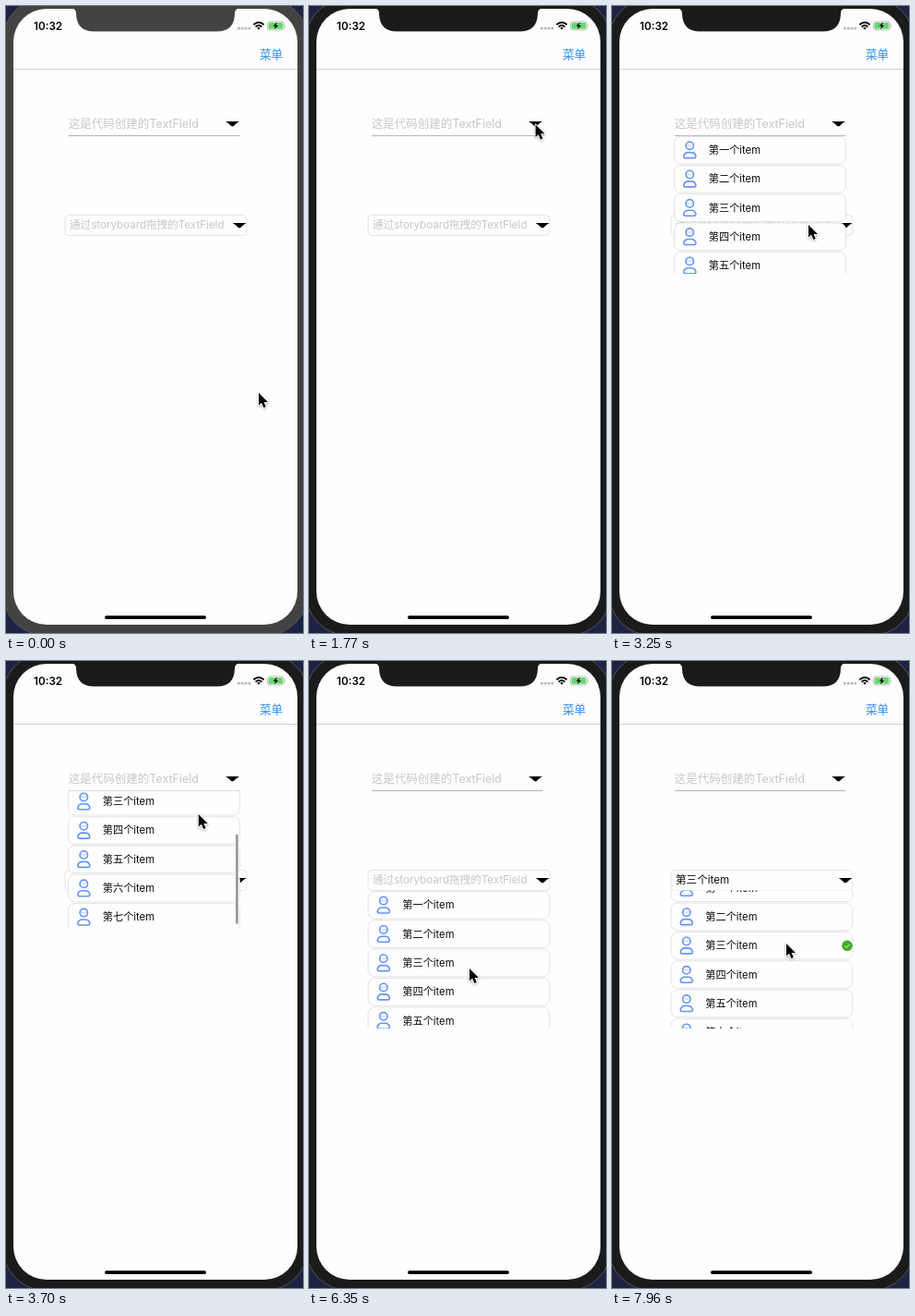
Animation, 322 px wide and 679 px high, one loop 8 s. Source, as an HTML page:

```html
<!DOCTYPE html>
<html lang="zh">
<head>
<meta charset="utf-8">
<title>Dropdown text fields</title>
<style>
  html, body { margin: 0; width: 100%; height: 100%; overflow: hidden; background: #1d2443; }
  svg { display: block; width: 322px; height: 679px; }
  text { font-family: Inter, "Noto Sans CJK SC", "Noto Sans CJK", sans-serif; white-space: pre; }
  .hint { fill: #c7c7cb; }
  .row { fill: #fefefe; stroke: #dedee0; stroke-width: .8; }
  .icon { fill: none; stroke: #6494f7; stroke-width: 1.6; stroke-linejoin: round; }
  .item { font-size: 11.2px; fill: #0a0a0a; }
</style>
</head>
<body>
<svg viewBox="0 0 322 679">
  <defs>
    <g id="person" class="icon">
      <circle cy="-4.8" r="4.2"/>
      <path d="M-3.4 -5.6Q0 -3.4 3.4 -5.6" stroke-width=".7" opacity=".6"/>
      <path d="M-4.6 8.6H4.6Q7 8.4 6.5 6.2Q5.2 2.6 1.8 2.6H-1.8Q-5.2 2.6 -6.5 6.2Q-7 8.4 -4.6 8.6Z"/>
    </g>
    <path id="arrow" d="M0 0H15Q12.5 1.2 9 4.7Q7.5 6 6 4.7Q2.5 1.2 0 0Z"/>
    <clipPath id="clip0"><rect x="60" y="140.5" width="210" height="0"/></clipPath>
    <clipPath id="clip1"><rect x="60" y="248.5" width="210" height="0"/></clipPath>
    <filter id="shadow" x="-50%" y="-50%" width="200%" height="200%">
      <feDropShadow dx="0" dy=".8" stdDeviation=".8" flood-opacity=".4"/>
    </filter>
  </defs>

  <rect width="322" height="679" fill="#1d2443"/>
  <g id="bezel">
    <rect x="-4" y="-9" width="332" height="691" rx="48" stroke="#50545e" stroke-width="1"/>
    <rect x="8" y="3" width="308" height="667" rx="36" fill="#fefefe"/>
    <path d="M71 2.5Q76 3 76 8Q76.5 27.5 95 27.5H229Q247.5 27.5 248 8Q248 3 253 2.5Z"/>
  </g>

  <text x="30" y="25.5" font-size="11.7" font-weight="600">10:32</text>
  <g fill="#b4b4b6">
    <rect x="251" y="23" width="2.8" height="2.6" rx=".8"/>
    <rect x="254.8" y="23" width="2.8" height="2.6" rx=".8"/>
    <rect x="258.6" y="23" width="2.8" height="2.6" rx=".8"/>
    <rect x="262.4" y="23" width="2.8" height="2.6" rx=".8"/>
  </g>
  <g fill="none" stroke="#000" stroke-width="1.9">
    <path d="M268.4 20.2Q274 15.2 279.6 20.2"/>
    <path d="M270.6 22.6Q274 19.6 277.4 22.6"/>
    <path d="M272.2 23.8Q274 22.4 275.8 23.8L274 25.8Z" fill="#000" stroke="none"/>
  </g>
  <rect x="283.4" y="16.9" width="18" height="9" rx="2.5" fill="none" stroke="#a9a9ab" stroke-width=".8"/>
  <rect x="284.6" y="18" width="15.6" height="6.8" rx="1.5" fill="#67d76c"/>
  <path d="M302.4 20Q304 21.4 302.4 22.8Z" fill="#a9a9ab"/>
  <path d="M293.8 17.6L289.6 21.8H292L291 25.2L295.2 20.9H292.8Z"/>

  <text x="275" y="56.6" font-size="12.6" font-weight="500" fill="#2f8ef0">菜单</text>
  <path d="M8 68.5H316" stroke="#cfcfd1"/>
  <rect x="107" y="660.2" width="110" height="3.8" rx="1.9"/>

  <text class="hint" x="67.8" y="132" font-size="12.5">这是代码创建的TextField</text>
  <path d="M68 140.5H253.5" stroke="#b2b2b4"/>
  <use href="#arrow" x="238" y="125"/>

  <rect x="64" y="226.4" width="196.8" height="22.2" rx="4" fill="#fefefe" stroke="#dfdfe1" stroke-width=".8"/>
  <text id="field" class="hint" x="69" y="241.4" font-size="11.6"></text>
  <use href="#arrow" x="245.6" y="235"/>

  <g clip-path="url(#clip0)"><g id="list0"></g><rect id="bar" x="249.2" width="2.4" height="97" rx="1.2" fill="#8e8e90"/></g>
  <g clip-path="url(#clip1)"><g id="list1"></g>
    <g id="check">
      <circle r="5.8" fill="#43ad27"/>
      <path d="M-2.8 .1L-.8 2.1L2.9 -1.8" fill="none" stroke="#d9f0d2" stroke-width="1"/>
    </g>
    <rect id="bar1" x="256.6" width="2.4" height="97" rx="1.2" fill="#8e8e90"/>
  </g>

  <path id="cursor" d="M1 1V14.6L4.1 11.8L6.4 17L8.8 16L6.6 10.9H11Z" stroke="#fff" stroke-width="1.6"
        paint-order="stroke" stroke-linejoin="round" filter="url(#shadow)"/>
</svg>

<script>
const LOOP = 8000, TICK = 147.4;
const PITCH = 31.3, HEIGHT = 149.5, OPEN_TICKS = 3.4;
const NUMERALS = [...'一二三四五六七'];
const $ = id => document.getElementById(id);

const label = i => `第${NUMERALS[i]}个item`;
const clamp = v => Math.min(1, Math.max(0, v));
const ease = v => (1 - Math.cos(Math.PI * clamp(v))) / 2;

// keys are [tick, ...values]; eased between neighbours, held outside
function track(keys, n) {
  const next = keys.findIndex(k => k[0] > n);
  if (next === 0) return keys[0].slice(1);
  if (next < 0) return keys.at(-1).slice(1);
  const [a, b] = [keys[next - 1], keys[next]];
  const p = ease((n - a[0]) / (b[0] - a[0]));
  return a.slice(1).map((v, i) => v + (b[i + 1] - v) * p);
}

const cursorKeys = [
  [5, 273, 418], [11, 244.6, 127.4], [18, 244.6, 127.4], [22, 212, 236], [25, 207.8, 165],
  [26, 207.8, 165], [29, 245, 127], [32, 245, 127], [33, 245, 151], [34, 251, 228.5], [35, 250, 236],
  [39, 250, 236], [43, 173, 332], [44, 176, 350], [47, 177, 332], [50, 177, 332], [53, 188, 305]
];
const scrollKeys = [
  [[22, 0], [25, 66.4]],
  [[44, 0], [47, 18.7]]
];

function buildList(list, x, width, top) {
  list.innerHTML = NUMERALS.map((_, i) => {
    const y = top + i * PITCH;
    return `<rect class="row" x="${x}" y="${y - 14.8}" width="${width}" height="29.6" rx="7"/>
      <use href="#person" x="${x + 16.8}" y="${y}"/>
      <text class="item" x="${x + 37.3}" y="${y + 4}">${label(i)}</text>`;
  }).join('');
}
buildList($('list0'), 67.5, 186, 156);
buildList($('list1'), 64, 196.8, 264.4);

function setList(index, open, scroll) {
  $('clip' + index).firstElementChild.setAttribute('height', HEIGHT * open);
  $('list' + index).setAttribute('transform', `translate(0 ${-scroll})`);
}

function setBar(bar, top, scroll, opacity) {
  bar.setAttribute('y', top + scroll * 0.69);
  bar.setAttribute('opacity', opacity);
}

function render(time) {
  const n = Math.floor(time / TICK + 0.07);
  const [scroll0] = track(scrollKeys[0], n);
  const [scroll1] = track(scrollKeys[1], n);
  const open0 = ease((n - 11.87) / OPEN_TICKS) - ease((n - 30.1) / OPEN_TICKS);
  const open1 = ease((n - 36.4) / OPEN_TICKS);

  $('bezel').setAttribute('fill', n < 12 ? '#434343' : '#1b1b1b');
  setList(0, open0, scroll0);
  setList(1, open1, scroll1);
  setBar($('bar'), 142, scroll0, n < 23 ? 0 : clamp((28 - n) / 2));
  setBar($('bar1'), 250.5, scroll1, n < 45 ? 0 : clamp((49 - n) / 2));

  const picked = n < 49 ? -1 : n < 54 ? 3 : 2;
  $('field').textContent = picked < 0 ? '通过storyboard拖拽的TextField' : label(picked);
  $('field').style.fill = picked < 0 ? '' : '#0a0a0a';
  $('check').setAttribute('visibility', picked < 0 ? 'hidden' : 'visible');
  $('check').setAttribute('transform', `translate(255 ${264.4 + picked * PITCH - scroll1})`);

  $('cursor').setAttribute('transform', `translate(${track(cursorKeys, n)})`);
}

const start = performance.now();
function frame() {
  render((performance.now() - start) % LOOP);
  requestAnimationFrame(frame);
}
frame();
</script>
</body>
</html>
```
